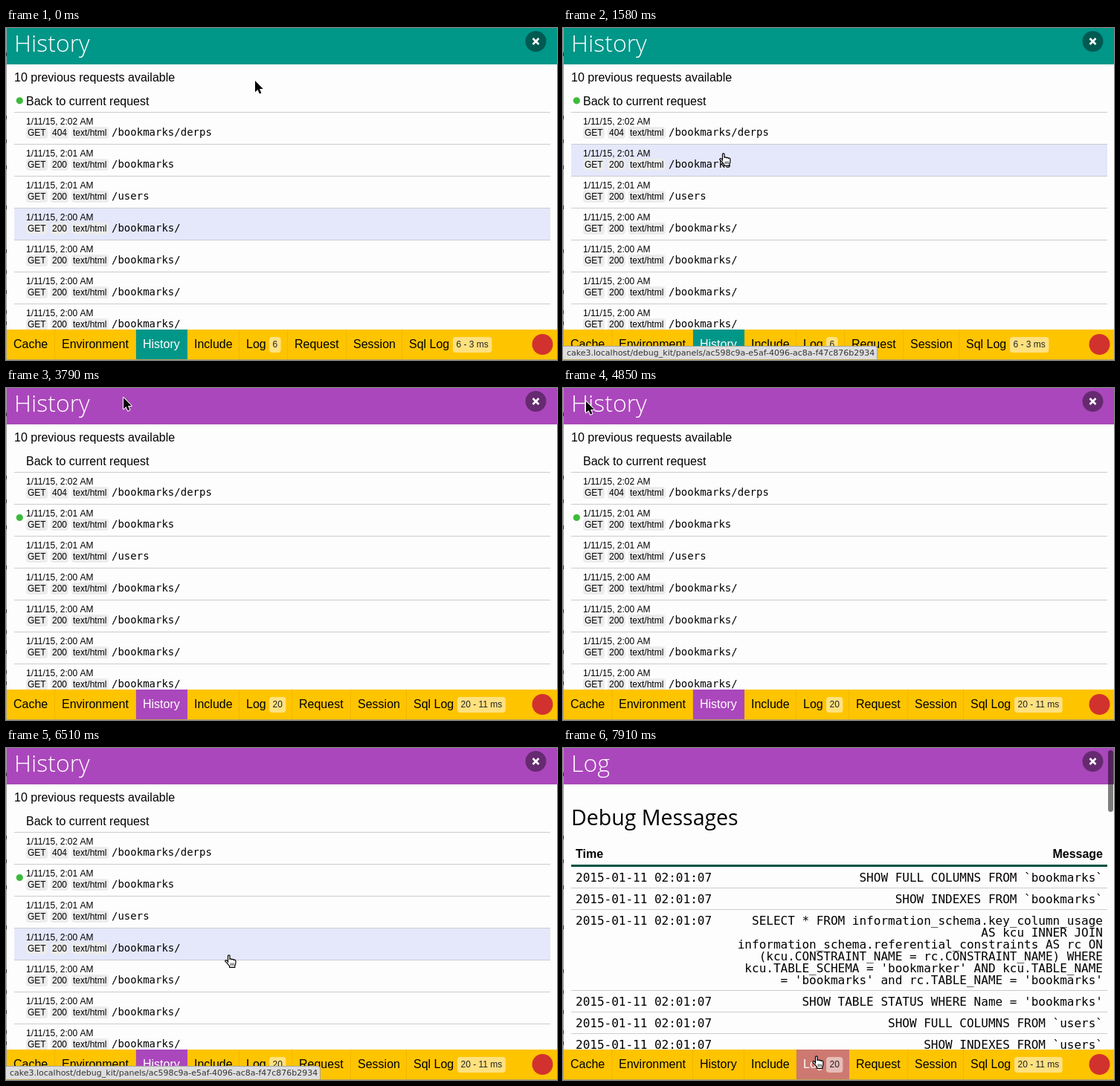
An HTML page with a canvas that plays this animation: 741 by 447 pixels, repeating every 8 s.

```html
<!DOCTYPE html>
<html lang="en">
<head>
<meta charset="utf-8">
<title>History panel</title>
<style>
html, body { margin: 0; width: 100%; height: 100%; overflow: hidden; background: #fdfdfd; }
canvas { display: block; }
</style>
</head>
<body>
<canvas id="stage" width="741" height="447"></canvas>
<script>
const ctx = document.getElementById('stage').getContext('2d');
const W = 741, H = 447, LOOP = 8000, TICK = 88;

const SANS = '"Liberation Sans", Arial, sans-serif';
const MONO = '"DejaVu Sans Mono", monospace';
const OPEN = '"Open Sans", sans-serif';
const BODY = '16px ' + SANS, SMALL = '12px ' + SANS;

const TEAL = [0, 150, 136], PURPLE = [171, 71, 188], AMBER = [255, 196, 0];
const HOST = 'cake3.localhost/debug_kit/panels/';
const ROW_URL = HOST + 'ac598c9a-e5af-4096-ac8a-f47c876b2934';
const LOG_URL = HOST + 'a6cef978-b005-4dc5-afae-5aaaf4b5737f';

const REQUESTS = [
  ['2:02', '404', '/bookmarks/derps'],
  ['2:01', '200', '/bookmarks'],
  ['2:01', '200', '/users'],
  ...Array(4).fill(['2:00', '200', '/bookmarks/'])
];
const LIST_TOP = 113, ROW_H = 43, BAR_TOP = 406;

const MESSAGES = [
  ['SHOW FULL COLUMNS FROM `bookmarks`'],
  ['SHOW INDEXES FROM `bookmarks`'],
  ['SELECT * FROM information_schema.key_column_usage',
   'AS kcu INNER JOIN',
   'information_schema.referential_constraints AS rc ON',
   '(kcu.CONSTRAINT_NAME = rc.CONSTRAINT_NAME) WHERE',
   "kcu.TABLE_SCHEMA = 'bookmarker' AND kcu.TABLE_NAME",
   "= 'bookmarks' and rc.TABLE_NAME = 'bookmarks'"],
  ["SHOW TABLE STATUS WHERE Name = 'bookmarks'"],
  ['SHOW FULL COLUMNS FROM `users`'],
  ['SHOW INDEXES FROM `users`']
];

// Pointer path: tick, x, y, eased
const PATH = [
  [0, 335, 71], [1, 333, 67], [2, 332, 64], [8, 332, 64],
  [18, 215, 168, 1], [22, 215, 168], [25, 214, 170], [36, 214, 170],
  [43, 158, 13, 1], [46, 43, 4], [49, 20, 1], [53, 12, 14], [54, 12, 14],
  [57, 70, 25], [60, 151, 31], [62, 120, 22], [64, 96, 15],
  [65, 131, 21], [66, 134, 24], [67, 134, 24],
  [77, 345, 348, 1], [81, 340, 414], [91, 340, 414]
];

const ARROW = new Path2D('M0 0V15.2L3.5 12L5.9 17.6L8.4 16.5L6 11.1H10.8Z');
const HAND = new Path2D('M4.5 10.5V2Q4.5 .8 5.8 .8Q7 .8 7 2V6.6Q7.2 5.8 8.3 5.8Q9.6 5.8 9.7 7' +
  'Q10 6.3 11 6.3Q12.3 6.3 12.4 7.6Q12.8 7 13.6 7.1Q14.9 7.3 14.9 8.8V11.5Q14.9 13.5 13.8 15' +
  'V17.3H6.6V15.6Q5 14 3.8 12.2L1.2 9.6Q.3 8.5 1.2 7.9Q2.2 7.3 3.3 8.4L4.5 9.6Z');
const KNUCKLES = new Path2D('M8.2 11.5V15M10.2 11.5V15M12.2 11.5V15');

const clamp = v => Math.max(0, Math.min(1, v));
const rgb = c => `rgb(${c.map(Math.round).join(',')})`;
const mix = (a, b, p) => a.map((v, i) => v + (b[i] - v) * p);

function rect(x, y, w, h, color) {
  ctx.fillStyle = color;
  ctx.fillRect(x, y, w, h);
}

function round(x, y, w, h, r, color) {
  ctx.fillStyle = color;
  ctx.beginPath();
  ctx.roundRect(x, y, w, h, r);
  ctx.fill();
}

function disc(x, y, r, color) {
  ctx.fillStyle = color;
  ctx.beginPath();
  ctx.arc(x, y, r, 0, 7);
  ctx.fill();
}

function text(s, x, y, font, color = '#000', align = 'left') {
  ctx.font = font;
  ctx.fillStyle = color;
  ctx.textAlign = align;
  ctx.fillText(s, x, y);
}

function pointerAt(k) {
  const i = Math.max(1, PATH.findIndex(p => p[0] >= k));
  const [k0, x0, y0] = PATH[i - 1], [k1, x1, y1, eased] = PATH[i];
  let p = clamp((k - k0) / (k1 - k0));
  if (eased) p = p * p * (3 - 2 * p);
  return { x: Math.round(x0 + (x1 - x0) * p), y: Math.round(y0 + (y1 - y0) * p) };
}

function drawHeader(title, color) {
  rect(1, 0, W - 1, 49, color);
  text(title, 11, 32, '300 32px ' + OPEN, '#fff');
  disc(712.5, 18, 14, 'rgba(0,0,0,.4)');
  ctx.strokeStyle = '#fff';
  ctx.lineWidth = 2.6;
  ctx.beginPath();
  ctx.moveTo(708.5, 14); ctx.lineTo(716.5, 22);
  ctx.moveTo(716.5, 14); ctx.lineTo(708.5, 22);
  ctx.stroke();
}

function drawHistory(hover, loaded) {
  text('10 previous requests available', 11, 72, BODY);
  if (hover === -1) rect(11, 84, 721, 29, '#e5e8fb');
  text('Back to current request', 27, 104, BODY);
  REQUESTS.forEach(([time, code, path], i) => {
    const y = LIST_TOP + i * ROW_H;
    rect(11, y, 721, 1, '#ccc');
    if (hover === i) rect(11, y + 1, 721, ROW_H - 1, '#e5e8fb');
    text(`1/11/15, ${time} AM`, 27, y + 17, SMALL);
    [['GET', 27, 29], [code, 60, 24], ['text/html', 88, 50]].forEach(([s, x, w]) => {
      round(x, y + 20, w, 16, 4, '#ececec');
      text(s, x + 2, y + 32, SMALL);
    });
    text(path, 142, y + 32, '14px ' + MONO);
  });
  disc(18.3, loaded ? LIST_TOP + ROW_H + 18.5 : 97.8, 4.6, '#3dbb3a');
}

function drawLog() {
  text('Debug Messages', 11, 104, '28.5px ' + OPEN);
  text('Time', 17, 148, 'bold ' + BODY);
  text('Message', 726, 148, 'bold ' + BODY, '#000', 'right');
  rect(11, 157, 721, 3, '#00533f');
  let y = 180;
  for (const lines of MESSAGES) {
    text('2015-01-11 02:01:07', 17, y, '16px ' + MONO);
    lines.forEach((s, i) => text(s, 726, y + i * 16, '16px ' + MONO, '#000', 'right'));
    y += 29 + (lines.length - 1) * 16;
    rect(11, y - 21, 721, 1, '#ccc');
  }
  round(733, 3, 7, 83, 3.5, 'rgba(0,0,0,.5)');
}

function drawTabs(active, activeColor, loaded) {
  const d = loaded ? 6 : 0;
  const tabs = [
    ['Cache', 0, 65], ['Environment', 65, 174], ['History', 174, 243], ['Include', 243, 313],
    ['Log', 313, 378 + d, loaded ? '20' : '6', 354], ['Request', 378 + d, 457 + d],
    ['Session', 457 + d, 532 + d],
    ['Sql Log', 532 + d, 662 + d, loaded ? '20 - 11 ms' : '6 - 3 ms', 601 + d]
  ];
  rect(1, BAR_TOP, W - 1, 40, rgb(AMBER));
  for (const [name, x0, x1, badge, bx] of tabs) {
    const on = name === active;
    if (on) rect(x0 + 1, BAR_TOP, x1 - x0, 40, activeColor);
    else if (name !== 'Sql Log') rect(x1, BAR_TOP, 1, 40, '#efb800');
    text(name, x0 + 10, 431, BODY, on ? '#fff' : '#000');
    if (badge) {
      ctx.font = SMALL;
      round(bx, 416, ctx.measureText(badge).width + 9, 21, 4, 'rgba(255,255,255,.5)');
      text(badge, bx + 4.5, 430, SMALL, '#222');
    }
  }
  disc(721.5, 426, 14, '#d2322d');
}

function drawStatus(url) {
  ctx.font = '11px "DejaVu Sans", sans-serif';
  const w = Math.round(ctx.measureText(url).width) + 9;
  round(0, 428, w, 18, [0, 4, 0, 0], '#a6a6a6');
  round(0, 429, w - 1, 17, [0, 3, 0, 0], '#dedede');
  text(url, 5, 441, ctx.font, '#333');
}

function drawPointer({ x, y }, link) {
  ctx.save();
  ctx.translate(link ? x - 5 : x, y);
  ctx.lineJoin = 'round';
  if (link) {
    ctx.fillStyle = '#fff';
    ctx.strokeStyle = '#000';
    ctx.lineWidth = 1.2;
    ctx.fill(HAND);
    ctx.stroke(HAND);
    ctx.lineWidth = 0.8;
    ctx.stroke(KNUCKLES);
  } else {
    ctx.strokeStyle = '#fff';
    ctx.lineWidth = 2;
    ctx.stroke(ARROW);
    ctx.fillStyle = '#000';
    ctx.fill(ARROW);
  }
  ctx.restore();
}

function drawEdges() {
  rect(0, 0, 1, H, '#a0a0a0');
  for (const y of [33, 118, 150, 185, 239, 298, 326, 353, 380, 395]) rect(0, y, 1, 5, '#333');
  rect(0, 446, W, 1, '#b9a45a');
}

function hoverRow(p, k) {
  if (k < 5) return 3;
  if (p.y < 84 || p.y >= BAR_TOP) return null;
  return Math.floor((p.y - LIST_TOP) / ROW_H);
}

function draw(ms) {
  const k = Math.floor((ms + 10) / TICK);
  const p = pointerAt(k);
  const hover = hoverRow(p, k);
  const onTab = p.y >= BAR_TOP;
  const link = onTab || (hover !== null && k >= 5);
  const loaded = k >= 28, log = k >= 88;
  const theme = rgb(mix(TEAL, PURPLE, clamp((k - 27) / 5)));

  rect(0, 0, W, H, '#fdfdfd');
  drawHeader(log ? 'Log' : 'History', theme);
  if (log) drawLog();
  else drawHistory(hover, loaded);
  const tabColor = log ? rgb(mix(AMBER, PURPLE, clamp((k - 87) * 0.2))) : theme;
  drawTabs(log ? 'Log' : 'History', tabColor, loaded);
  drawEdges();
  if (link && !log) drawStatus(onTab ? LOG_URL : ROW_URL);
  drawPointer(p, link);
}

function loop() {
  draw(performance.now() % LOOP);
  requestAnimationFrame(loop);
}
loop();
</script>
</body>
</html>
```
